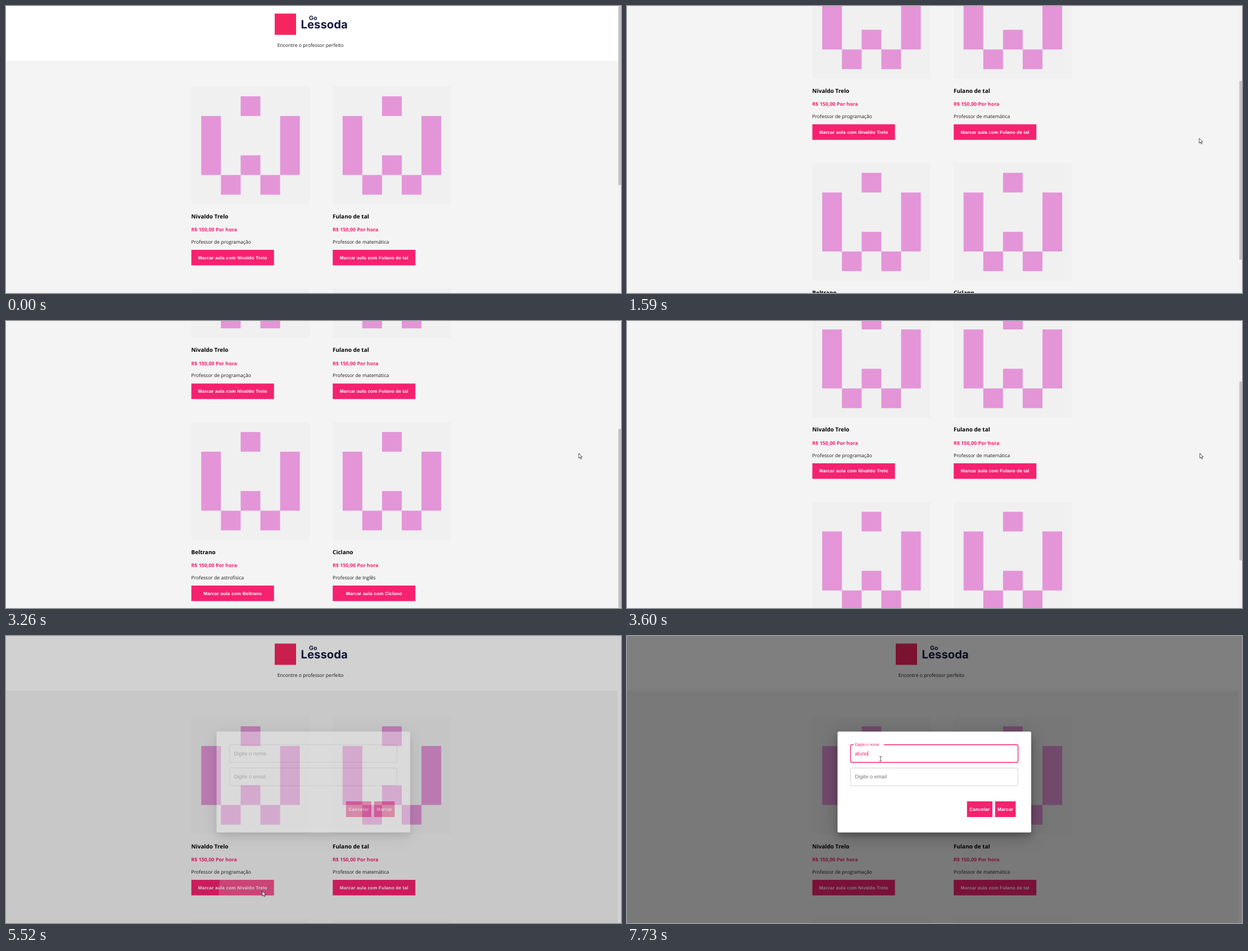
Write an HTML page that moves like this. It is 1094 by 512 pixels and loops after 8 s.

```html
<!DOCTYPE html>
<html lang="pt-BR">
<head>
<meta charset="utf-8">
<title>Professores</title>
<style>
  html, body { margin: 0; width: 100%; height: 100%; overflow: hidden; background: #fff; }
  svg { display: block; text-rendering: geometricPrecision; }
  text { font-family: "Open Sans", "Noto Sans", sans-serif; font-size: 8.6px; fill: #1a1a1a; }
  .brand { font: 700 20.3px Inter, sans-serif; fill: #15193f; }
  .brand.small { font-size: 10.6px; }
  .name { font-size: 10px; font-weight: 700; fill: #000; }
  .price { font-size: 8.9px; font-weight: 700; fill: #f52270; }
  .action { font: 700 8.1px "Liberation Sans", Arial, sans-serif; letter-spacing: .2px; fill: #fff; text-anchor: middle; }
  .input { font: 9.4px "Liberation Sans", Arial, sans-serif; fill: #777; }
  .pink { fill: #f52270; }
  .field { fill: none; stroke: #c4c4c4; stroke-width: .8; }
  #paper { fill: #fff; filter: drop-shadow(0 6px 5px rgba(0,0,0,.2)) drop-shadow(0 7px 15px rgba(0,0,0,.24)); }
</style>
</head>
<body>
<svg id="stage" width="1094" height="512" viewBox="0 0 1094 512"></svg>
<script>
const PINK = '#f52270';
const rect = (x, y, w, h, attrs = '') => `<rect x="${x}" y="${y}" width="${w}" height="${h}" ${attrs}/>`;
const text = (x, y, cls, str, attrs = '') => `<text x="${x}" y="${y}" class="${cls}" ${attrs}>${str}</text>`;
const button = (x, y, w, h, label) =>
  rect(x, y, w, h, 'class="pink"') + text(x + w / 2, y + h / 2 + 2.8, 'action', label);

const CELL = 35.08;
const avatar = [[2, 0, 1], [0, 1, 3], [4, 1, 3], [2, 3, 1], [1, 4, 1], [3, 4, 1]]
  .map(([col, row, len]) => rect((col + .5) * CELL, (row + .5) * CELL, CELL, len * CELL, 'fill="#e395d8"')).join('');

const teachers = [['Nivaldo Trelo', 'programação'], ['Fulano de tal', 'matemática'],
                  ['Beltrano', 'astrofísica'], ['Ciclano', 'Inglês']];
const card = ([name, subject], i) => `
  <g transform="translate(${329.7 + i % 2 * 251.5} ${143.6 + (i >> 1) * 360.4})">
    ${rect(0, 0, 210.4, 210.2, 'fill="#f0f0f0"')}${avatar}
    ${text(-.2, 235, 'name', name)}
    ${text(-.2, 258.6, 'price', 'R$ 150,00 Por hora')}
    ${text(-.2, 280.2, '', 'Professor de ' + subject)}
    ${button(0, 291.4, 147, 27.7, 'Marcar aula com ' + name)}
  </g>`;

document.getElementById('stage').innerHTML = `
  <clipPath id="clip">${rect(329.7, 435, 147, 27.7)}</clipPath>
  ${rect(0, 0, 1094, 512, 'fill="#f4f4f4"')}
  <g id="page">
    ${rect(0, 0, 1094, 97.5, 'fill="#fff"')}
    ${rect(478, 13.5, 38, 38, 'fill="#f5265f"')}
    ${text(539, 25, 'brand small', 'Go')}
    ${text(524.5, 40.2, 'brand', 'Lessoda')}
    ${text(482.7, 72.6, '', 'Encontre o professor perfeito')}
    ${teachers.map(card).join('')}
    <circle id="ripple" cx="456" cy="455" fill="#fff" clip-path="url(#clip)"/>
  </g>
  <g id="scrollbar">
    ${rect(1089, 0, 5, 512, 'fill="#f1f1f1"')}${rect(1089.3, .5, 5, 319, 'id="thumb" fill="#c1c1c1"')}
  </g>
  ${rect(1088, 0, 6, 512, 'id="gutter" fill="#fff"')}
  ${rect(0, 0, 1094, 512, 'id="backdrop"')}
  <g id="dialog">
    ${rect(374.5, 170.5, 344.5, 180, 'id="paper" rx="2.3"')}
    ${rect(397.6, 194, 298, 31.5, 'id="nameField" class="field" rx="2.3"')}
    ${rect(397.6, 235.5, 298, 31.5, 'id="mailField" class="field" rx="2.3"')}
    ${rect(403, 192.5, 54, 3, 'id="notch" fill="#fff"')}
    ${text(0, 0, 'input', 'Digite o nome', 'id="label"')}
    ${text(405.4, 254, 'input', 'Digite o email')}
    ${text(405.4, 213.2, 'input pink', '', 'id="typed"')}
    ${rect(0, 205, .8, 10, 'id="caret" class="pink"')}
    ${button(604.8, 295, 45.2, 28, 'Cancelar')}
    ${button(654.8, 295, 36.6, 28, 'Marcar')}
  </g>
  <g id="cursor">
    <path id="arrow" d="M0 0V8.8L2 7 3.4 10.2 4.8 9.6 3.4 6.5H6.1Z" fill="#fff" stroke="#15152a" stroke-width=".75"/>
    <path id="beam" d="M-2-4.2H-.5L0-3.7.5-4.2H2M0-3.7V3.7M-2 4.2H-.5L0 3.7.5 4.2H2" fill="none" stroke="#222" stroke-width=".8"/>
  </g>`;

const el = Object.fromEntries([...document.querySelectorAll('[id]')].map(node => [node.id, node]));
const set = (node, attrs) => { for (const key in attrs) node.setAttribute(key, attrs[key]); };
const show = (node, on) => set(node, { visibility: on ? 'visible' : 'hidden' });
const progress = (t, start, length) => Math.min(1, Math.max(0, (t - start) / length));

// cubic-bezier(x1, 0, .2, 1), solved by bisection
function ease(p, x1 = .4) {
  let lo = 0, hi = 1;
  for (let i = 0; i < 20; i++) {
    const u = (lo + hi) / 2, v = 1 - u;
    if (3 * v * v * u * x1 + .6 * v * u * u + u ** 3 < p) lo = u; else hi = u;
  }
  return lo * lo * (3 - 2 * lo);
}

// time, x, y
const track = [[130, 433, 470], [340, 545, 440], [620, 780, 385], [900, 962, 345], [1190, 1018, 236],
  [2010, 1018, 236], [2100, 1019, 236], [4300, 1019, 236], [4520, 930, 290], [4760, 640, 420],
  [4980, 480, 464], [5110, 453, 459], [5180, 456, 455], [5600, 456, 455], [5800, 454, 370],
  [6000, 451, 262], [6190, 451, 219]];
function cursorAt(t) {
  const i = track.findIndex(key => key[0] > t);
  if (i < 0) return track[track.length - 1].slice(1);
  if (!i) return track[0].slice(1);
  const a = track[i - 1], b = track[i], p = progress(t, a[0], b[0] - a[0]);
  return [a[1] + (b[1] - a[1]) * p, a[2] + (b[2] - a[2]) * p];
}

const FOCUS = 6320, OPEN = 5454, PRESS = 5304, MAX_SCROLL = 323.6;
const keyTimes = [7070, 7140, 7400, 7600, 7730];

function draw(t) {
  const down = 1 - (1 - progress(t, 1255, 755)) ** 2;
  const up = (1 - Math.cos(Math.PI * progress(t, 3250, 760))) / 2;
  const scroll = MAX_SCROLL * (down - up);
  set(el.page, { transform: `translate(0 ${-scroll})` });
  set(el.thumb, { transform: `translate(0 ${scroll * .594})` });

  const grow = ease(progress(t, PRESS, 550));
  set(el.ripple, { r: 129 * grow, opacity: (.1 + .2 * grow) * (1 - progress(t, 5520, 400)) });

  const open = t >= OPEN, fade = ease(progress(t, OPEN, 225));
  show(el.scrollbar, !open);
  show(el.gutter, open);
  set(el.backdrop, { opacity: fade / 2 });
  set(el.dialog, { opacity: fade });

  const [x, y] = cursorAt(t);
  const overName = open && y > 194 && y < 225.5, overMail = open && y > 235.5 && y < 267;
  const beam = overName || overMail;
  set(el.cursor, { transform: `translate(${x} ${y})`, opacity: t < 130 ? 0 : 1 });
  show(el.arrow, !beam);
  show(el.beam, beam);

  const focused = t >= FOCUS, shrink = ease(progress(t, FOCUS, 200), 0);
  el.nameField.style.stroke = overName ? PINK : '';
  el.nameField.style.strokeWidth = focused ? 1.3 : '';
  el.mailField.style.stroke = overMail ? PINK : '';
  set(el.notch, { width: 54 * shrink });
  set(el.label, { transform: `translate(405.4 ${212.8 - 16.7 * shrink}) scale(${1 - .25 * shrink})` });
  el.label.style.fill = focused ? PINK : '';

  const count = keyTimes.filter(k => k <= t).length;
  el.typed.textContent = 'aluno'.slice(0, count);
  const since = t - (count ? keyTimes[count - 1] : FOCUS);
  show(el.caret, focused && since % 1080 < 540);
  set(el.caret, { x: 405.3 + (count ? el.typed.getComputedTextLength() : 0) });
}

const begin = performance.now();
function tick() {
  draw((performance.now() - begin) % 8000);
  requestAnimationFrame(tick);
}
tick();
</script>
</body>
</html>
```
